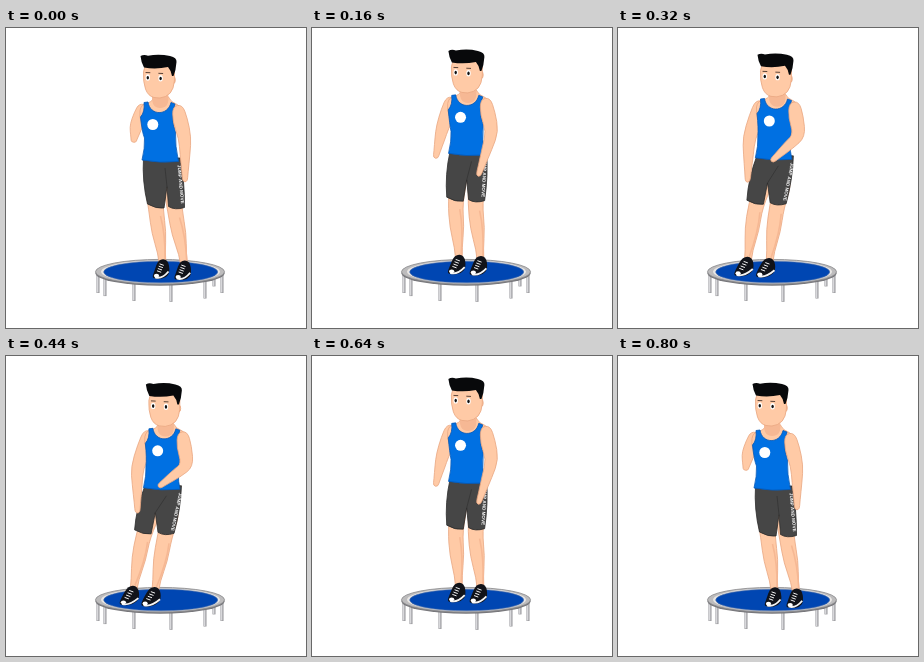
An HTML page with a canvas that plays this animation: 300x300 px, repeating every 0.84 s.

```html
<!DOCTYPE html>
<html lang="en">
<head>
<meta charset="utf-8">
<title>Trampoline</title>
<style>
html, body { margin: 0; width: 100%; height: 100%; overflow: hidden; background: #fff; }
canvas { display: block; width: 300px; height: 300px; }
</style>
</head>
<body>
<canvas id="stage"></canvas>
<script>
const canvas = document.getElementById('stage');
const ctx = canvas.getContext('2d');
const ratio = window.devicePixelRatio || 1;
canvas.width = canvas.height = 300 * ratio;

const LOOP = 840, STEP = 40;
const SKIN = '#ffcaa6', EDGE = '#e9a681', SHADE = '#f6b894';
const BLUE = '#0070e2', SHORTS = '#464646', BLACK = '#111319';

const mix = (a, b, k) => [a[0] + (b[0] - a[0]) * k, a[1] + (b[1] - a[1]) * k];
const add = (a, x, y) => [a[0] + x, a[1] + y];

// Joints sway in a straight line while a hop arcs them off it; p runs 0 to 1.
function poseAt(p) {
  const hop = 4 * p * (1 - p);
  const at = (x, y, dx, dy, hopX, hopY) => [x + dx * p + hopX * hop, y + dy * p + hopY * hop];
  const chest = at(153, 80, 5, -1, 0, -7.5);
  const waist = at(154, 132, 1.5, 0.5, 0, -7.5);
  const kneeL = at(150, 182, -13, -1.5, -2.5, -7);
  const ankleL = at(157, 236, -31, -1, 1, -4.5);
  return {
    head: at(0, 0, 5.5, 1, 0, -6),
    chest, waist, kneeL, ankleL,
    kneeR: add(kneeL, 19 + 2.5 * p, 1.5),
    ankleR: add(ankleL, 21.7, 1.2),
    toe: [-4 - 3 * p, 10.5],
    armL: add(chest, -15, 1.5),
    elbowL: at(130, 98, 1, 15, 0, -4),
    handL: at(128, 111, 4, 38, -5, 0),
    armR: add(chest, 18.5, 2.5),
    elbowR: at(179, 110, 2.5, 0, 0.5, -7),
    handR: at(179, 145, -21, -19, -3, 1)
  };
}

function paint(fill, stroke, width = 0.8) {
  if (fill) { ctx.fillStyle = fill; ctx.fill(); }
  if (stroke) { ctx.strokeStyle = stroke; ctx.lineWidth = width; ctx.stroke(); }
}

function oval(x, y, rx, ry, fill, stroke, width) {
  ctx.beginPath();
  ctx.ellipse(x, y, rx, ry, 0, 0, 7);
  paint(fill, stroke, width);
}

function line(a, b, color, width) {
  ctx.beginPath();
  ctx.moveTo(...a);
  ctx.lineTo(...b);
  paint(null, color, width);
}

function curve(a, bend, b, color, width) {
  ctx.beginPath();
  ctx.moveTo(...a);
  ctx.quadraticCurveTo(...bend, ...b);
  paint(null, color, width);
}

// Closed rounded outline around the points.
function blob(pts, fill, stroke, width) {
  ctx.beginPath();
  ctx.moveTo(...mix(pts[pts.length - 1], pts[0], 0.5));
  pts.forEach((p, i) =>
    ctx.quadraticCurveTo(...p, ...mix(p, pts[(i + 1) % pts.length], 0.5)));
  ctx.closePath();
  paint(fill, stroke, width);
}

// Tapered limb along joints with a half width at each.
function limb(pts, widths) {
  const left = [], right = [];
  pts.forEach((p, i) => {
    const a = pts[Math.max(i - 1, 0)], b = pts[Math.min(i + 1, pts.length - 1)];
    const dx = b[0] - a[0], dy = b[1] - a[1], k = widths[i] / Math.hypot(dx, dy);
    left.push(add(p, dy * k, -dx * k));
    right.unshift(add(p, -dy * k, dx * k));
  });
  blob(left.concat(right), SKIN, EDGE);
}

function trampoline() {
  const post = (x, length) => {
    const y = 243.6 + 12.4 * Math.sqrt(1 - ((x - 154) / 64.5) ** 2);
    line([x, y], [x, y + length], '#929296', 3);
    line([x - 0.3, y], [x - 0.3, y + length - 0.5], '#d8d8db', 1.5);
  };
  [92, 99, 128, 165, 199, 216].forEach(x => post(x, 18));
  post(208, 8);
  oval(154, 245.2, 64.5, 12.6, '#77777b');
  oval(154, 243.8, 64.5, 12.4, '#bdbcbd', '#88888b', 0.8);
  oval(154.5, 243.8, 59.5, 11.3, '#e8e6e4');
  oval(154.7, 244, 57, 10.8, '#0046b2', '#4a6ea8', 0.6);
}

function leg(hip, knee, ankle) {
  const calf = mix(knee, ankle, 0.42);
  limb([hip, knee, calf, mix(knee, ankle, 0.8), add(ankle, 0, 5)], [9, 7.2, 7.2, 3.6, 3.3]);
  curve(add(knee, 4.5, 6), add(calf, 6.5, 2), add(ankle, 2, -5), SHADE, 1.6);
}

function shoe(ankle, reach) {
  const toe = add(ankle, ...reach);
  blob([add(ankle, -4.5, -5), add(ankle, 5, -4.5), add(ankle, 7, 8), add(toe, 7, 3.5),
        add(toe, -1, 4.5), add(toe, -7, 3.5), add(toe, -5, -2.5)], BLACK);
  curve(add(toe, -4, 2.8), add(toe, 3, 5), add(ankle, 5.5, 7.5), '#f5f5f5', 1.8);
  oval(toe[0] - 2.5, toe[1] + 1.2, 2.6, 1.9, '#fff');
  for (let k = 0.1; k < 0.8; k += 0.22) {
    const c = add(mix(ankle, toe, k), -1, -0.5);
    line(add(c, -2, -0.7), add(c, 2.2, 0.8), '#f4f4f4', 1);
  }
}

function shorts({ waist: w, kneeL: l, kneeR: r }) {
  const crotch = add(mix(l, r, 0.5), 1.5, -24);
  ctx.beginPath();
  ctx.moveTo(...add(w, -16.5, -2));
  ctx.quadraticCurveTo(...add(mix(w, l, 0.5), -16, -4), ...add(l, -8.5, -6));
  ctx.quadraticCurveTo(...add(l, 0, -1), ...add(l, 8, -2));
  ctx.lineTo(...crotch);
  ctx.lineTo(...add(r, -6.5, -5));
  ctx.quadraticCurveTo(...add(r, 0, -1), ...add(r, 9.5, -4));
  ctx.quadraticCurveTo(...add(mix(w, r, 0.45), 18, -2), ...add(w, 20, -2));
  ctx.closePath();
  paint(SHORTS, '#2b2b2b');
  line(crotch, add(w, 5, 8), '#343434', 0.8);

  const a = add(w, 18.7, 5), b = add(r, 7.5, -6);
  ctx.save();
  ctx.translate(...a);
  ctx.rotate(Math.atan2(b[1] - a[1], b[0] - a[0]));
  ctx.font = 'bold 4.6px "Liberation Sans", Arial, sans-serif';
  ctx.textBaseline = 'middle';
  ctx.fillStyle = '#fff';
  ctx.fillText('JUMP AND MOVE', 0, 0);
  ctx.restore();
}

function torso({ chest: c, waist: w, armL, armR }) {
  blob([add(c, -5, -13), add(c, 9, -13), add(c, 12, -6), add(armR, 3, -5), add(armR, 4, 8),
        add(c, 17, 22), add(c, -15, 22), add(armL, -5, 7), add(armL, -3, -5),
        add(c, -7, -6)], SKIN, EDGE);
  ctx.beginPath();
  ctx.moveTo(...add(c, -15, -5.5));
  ctx.quadraticCurveTo(...add(c, -14, 4), ...add(c, -18.5, 9));
  ctx.quadraticCurveTo(...add(c, -17, 24), ...add(w, -15.5, -22));
  ctx.quadraticCurveTo(...add(w, -15, -12), ...add(w, -18, 0));
  ctx.quadraticCurveTo(...add(w, 0, 3.5), ...add(w, 18.5, 1.5));
  ctx.quadraticCurveTo(...add(w, 15, -14), ...add(c, 16.5, 24));
  ctx.quadraticCurveTo(...add(c, 11, 10), ...add(c, 16, -4));
  ctx.lineTo(...add(c, 12, -5.5));
  ctx.bezierCurveTo(...add(c, 9, 8), ...add(c, -9, 8), ...add(c, -11, -6));
  ctx.closePath();
  paint(BLUE, '#0559b8');
  oval(c[0] - 6.2, c[1] + 16.5, 5.5, 5.5, '#fff');
}

function arm(shoulder, elbow, hand) {
  limb([add(shoulder, 0, -5), mix(shoulder, elbow, 0.35), elbow,
        mix(elbow, hand, 0.45), hand, mix(elbow, hand, 1.25)],
       [5, 7.5, 6.2, 5, 3, 2.4]);
}

function head(offset) {
  ctx.save();
  ctx.translate(...offset);
  blob([[146, 62], [162, 60], [163, 77], [154, 81], [146, 77]], SHADE);
  oval(167.5, 52, 1.8, 3.5, SKIN, EDGE);
  blob([[138, 34], [168, 34], [169, 54], [165, 66], [154, 71], [142, 68], [137, 54]], SKIN, EDGE);
  ctx.beginPath();
  ctx.moveTo(138, 39.5);
  ctx.quadraticCurveTo(135, 34, 134.5, 28);
  ctx.quadraticCurveTo(138, 26, 142, 27.7);
  ctx.quadraticCurveTo(153, 25.5, 164, 28);
  ctx.quadraticCurveTo(171, 29.5, 170.5, 34);
  ctx.quadraticCurveTo(170, 42, 167.5, 48);
  ctx.lineTo(166, 48);
  ctx.quadraticCurveTo(165.5, 43, 162, 39);
  ctx.quadraticCurveTo(150, 41.5, 138, 39.5);
  paint('#08090b');
  [141.8, 154.6].forEach((x, i) => {
    const y = 49.5 + i * 0.8;
    oval(x, y, 2.2, 3.2, '#fff');
    oval(x, y + 0.2, 1.2, 1.8, '#111');
    line([x - 2.2, y - 5], [x + 2.5, y - 4.8], '#33231c', 0.8);
  });
  ctx.restore();
}

function draw(p) {
  const P = poseAt(p);
  ctx.setTransform(ratio, 0, 0, ratio, 0, 0);
  ctx.fillStyle = '#fff';
  ctx.fillRect(0, 0, 300, 300);
  ctx.lineJoin = 'round';
  trampoline();
  leg(add(P.waist, -7, 18), P.kneeL, P.ankleL);
  leg(add(P.waist, 11, 18), P.kneeR, P.ankleR);
  shoe(P.ankleL, P.toe);
  shoe(P.ankleR, P.toe);
  shorts(P);
  arm(P.armL, P.elbowL, P.handL);
  torso(P);
  arm(P.armR, P.elbowR, P.handR);
  head(P.head);
}

function tick() {
  const step = Math.floor(performance.now() % LOOP / STEP);
  draw((1 - Math.cos(Math.PI * step / 10)) / 2);
  requestAnimationFrame(tick);
}
tick();
</script>
</body>
</html>
```
